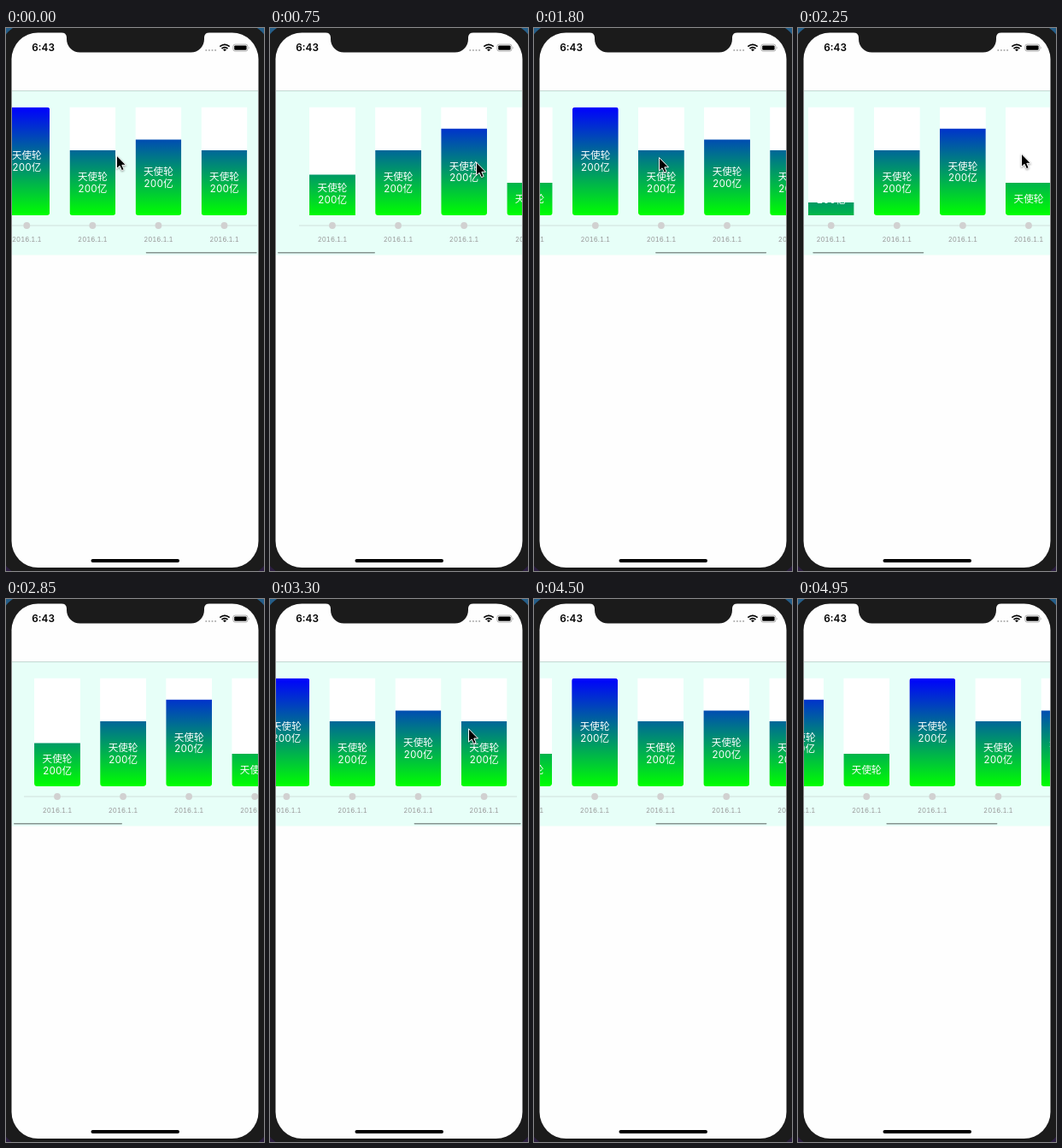
Animation of 302x635 px, one loop 5220 ms. Source, as an HTML page:

```html
<!DOCTYPE html>
<html lang="zh">
<head>
<meta charset="utf-8">
<style>
  html, body { margin: 0; width: 100%; height: 100%; overflow: hidden; background: #1b1b1b; }
  svg { display: block; }
  text { font-family: Inter, "Noto Sans CJK SC", "Noto Sans CJK", sans-serif; }
  .value, .date { text-anchor: middle; font-variant-numeric: tabular-nums; }
  .value { font-size: 11.6px; fill: #fff; }
  .date { font-size: 7.8px; fill: #999; }
  #cursor { filter: drop-shadow(0 1px 1px #0006); }
</style>
</head>
<body>
<svg width="302" height="635" viewBox="0 0 302 635">
  <defs>
    <linearGradient id="desk" x2="0" y2="1">
      <stop stop-color="#255f8a"/><stop offset="1" stop-color="#2b1d40"/>
    </linearGradient>
    <linearGradient id="heat" x2="0" y2="1">
      <stop stop-color="#00f"/><stop offset="1" stop-color="#0f0"/>
    </linearGradient>
    <clipPath id="screen"><rect x="7" y="74" width="288" height="192"/></clipPath>
  </defs>

  <!-- phone body and screen -->
  <rect width="302" height="635" fill="url(#desk)"/>
  <rect x="-8" y="-6" width="318" height="648" rx="36" fill="#1b1b1b"/>
  <rect x="6.5" y="5.5" width="289" height="625.5" rx="31" fill="#fefefe"/>
  <path d="M65 5A6 6 0 0 1 71 11V13A15.5 15.5 0 0 0 86.5 28.5H216.5A15.5 15.5 0 0 0 232 13V11A6 6 0 0 1 238 5Z" fill="#1b1b1b"/>
  <rect x="99.5" y="621" width="103.5" height="4" rx="2"/>

  <!-- status bar -->
  <text x="30.3" y="27.3" font-size="11.8" font-weight="600">6:43</text>
  <path d="M234.3 26H246" stroke="#b0b0b0" stroke-width="2.2" stroke-linecap="round" stroke-dasharray="0 3.6"/>
  <g fill="none" stroke="#000" stroke-width="1.7">
    <path d="M250.3 21.7Q256 17 261.7 21.7M252.5 24Q256 21.2 259.5 24"/>
    <path d="M254 25.2Q256 23.8 258 25.2L256 27.3Z" fill="#000" stroke="none"/>
  </g>
  <rect x="265.9" y="19.1" width="17" height="8" rx="2.3" fill="none" stroke="#999" stroke-width=".8"/>
  <rect x="267.2" y="20.4" width="14.4" height="5.4" rx="1.2"/>
  <path d="M284 21.7Q285.4 23.1 284 24.5Z" fill="#999"/>

  <!-- scrolling chart -->
  <path d="M7 73.5H295" stroke="#c3d8d2"/>
  <g clip-path="url(#screen)">
    <rect x="6" y="74" width="290" height="191.5" fill="#e7fff8"/>
    <g id="strip"><path d="M-39 231H578" stroke="#d0e0db"/></g>
    <rect id="thumb" y="262" height="1.4" rx=".7"/>
  </g>
  <path id="cursor" d="M0 0V15.5L3.6 12.3L6 17.7L8.7 16.5L6.3 11.3H11Z" stroke="#fff"/>
</svg>
<script>
const TOP = 92.5, HEIGHT = 126.5, WIDTH = 53.95, GAP = 77.07;
const START = 57, END = -284;            // scroll limits, as centre of the first column
const LOOP = 5220, STEP = 150, LAST = 4950;
const levels = [.4, .6, .8, .3, 1, .6, .7, .6];
const $ = id => document.getElementById(id);
const set = (el, attrs) => Object.entries(attrs).forEach(([k, v]) => el.setAttribute(k, v));

const value = (s, y) => `<text class="value" y="${y + 4.3}">${s}</text>`;

function column(level, i) {
  const y = HEIGHT * (1 - level), mid = TOP + y + HEIGHT * level / 2;
  const words = level < .4 ? value('天使轮', mid - .8)
    : value('天使轮', mid - 6.9) + value('200亿', mid + 6.7);
  return `<g transform="translate(${i * GAP})">
    <svg x="${-WIDTH / 2}" y="${TOP}" width="${WIDTH}" height="${HEIGHT}">
      <rect width="100%" height="100%" fill="#fff"/>
      <svg class="bar" y="${y}" width="${WIDTH}" height="${HEIGHT * level}">
        <rect y="${-y}" width="${WIDTH}" height="${HEIGHT}" rx="3.5" fill="url(#heat)"/>
      </svg>
    </svg>
    ${words}
    <circle cy="231" r="3.9" fill="#d1d1d1"/>
    <text class="date" y="250">2016.1.1</text>
  </g>`;
}
$('strip').innerHTML += levels.map(column).join('');
const firstBar = document.querySelector('.bar');

// Turning points of the swipes: [time, x] and [time, x, y]
const swipes = [[0, END], [750, 73], [1620, END], [2412, 78], [2850, 60],
  [3150, -290], [3700, END], [4200, END], [LAST, -151]];
const pointer = [[0, 129.5, 149], [750, 241.5, 157], [1350, 31.5, 156],
  [2250, 261.5, 147], [3750, 224.5, 153], [4200, 219, 346]];

const clamp = x => Math.min(1, Math.max(0, x));
const ease = x => (x = clamp(x), x * x * (3 - 2 * x));

function follow(keys, t) {
  const next = keys.findIndex(k => k[0] > t);
  const b = keys.at(next), a = next > 0 ? keys[next - 1] : b;
  const p = ease((t - a[0]) / (b[0] - a[0] || 1));
  return a.slice(1).map((v, i) => v + (b[i + 1] - v) * p);
}

function draw(now) {
  const t = Math.min(Math.floor(now % LOOP / STEP) * STEP, LAST);
  const [x] = follow(swipes, t);
  set($('strip'), { transform: `translate(${x})` });

  // the first column rises again whenever it scrolls back into view
  const rise = ease((t - (t < 1620 ? 368 : 2087)) / 450);
  set(firstBar, { y: HEIGHT * (1 - levels[0] * rise) });

  // the indicator shrinks past either limit and fades at rest
  const before = Math.max(0, x - START), after = Math.max(0, END - x);
  set($('thumb'), {
    x: 9 + 154.7 * clamp((START - x) / (START - END)) + after,
    width: 130 - before - after,
    opacity: .42 * (t > 4200 ? 1 : clamp((3900 - t) / 300)),
  });

  const shown = t < 2400 || (t >= 3300 && t <= 4200);
  set($('cursor'), {
    visibility: shown ? 'visible' : 'hidden',
    transform: `translate(${follow(pointer, t)})`,
  });
}

let began;
function tick(now) {
  began ??= now;
  draw(now - began);
  requestAnimationFrame(tick);
}
draw(0);
requestAnimationFrame(tick);
</script>
</body>
</html>
```
